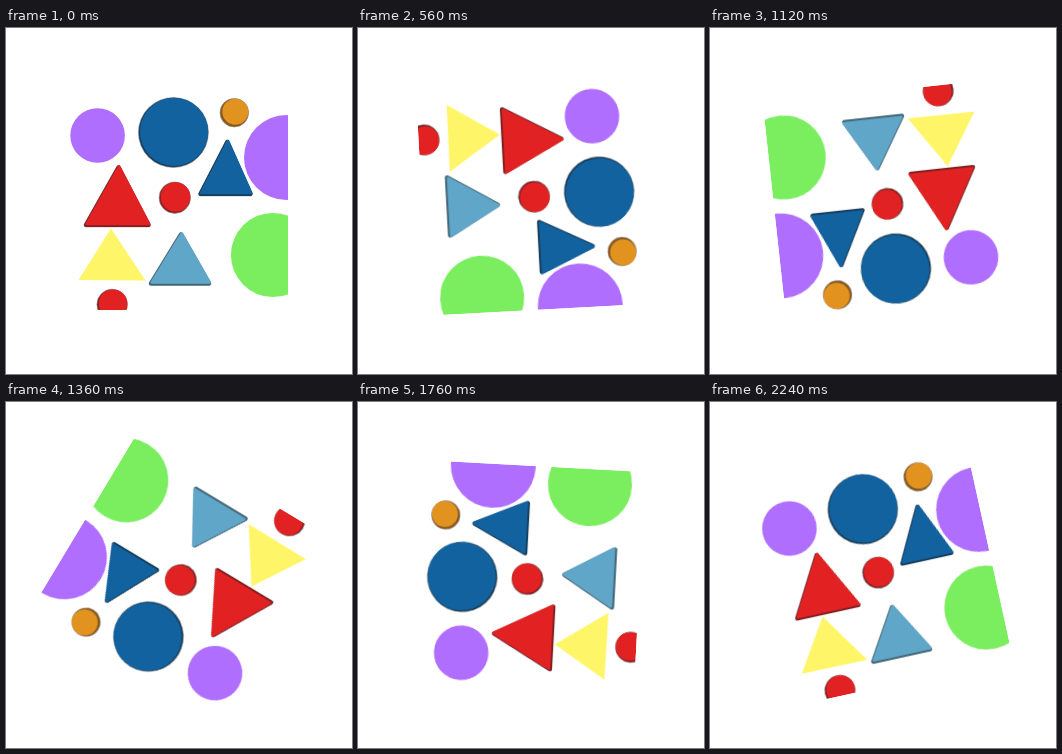
These frames come from a looping animation (346 px wide and 346 px high, 2.32 s). An HTML page:

```html
<!DOCTYPE html>
<html lang="en">
<head>
<meta charset="utf-8">
<title>Rotating shapes</title>
<style>
  html, body { margin: 0; width: 100%; height: 100%; overflow: hidden; background: #fff; }
  svg { display: block; width: 100vw; height: 100vh; }
  #board { transform-origin: 173px 173px; }
</style>
</head>
<body>
<svg viewBox="0 0 346 346">
  <clipPath id="crop"><rect x="64" y="64" width="218" height="218"/></clipPath>
  <g id="board"><g id="shapes" clip-path="url(#crop)"></g></g>
</svg>
<script>
const LOOP = 2320, STEPS = 29;
const shapes = document.getElementById('shapes');

function add(tag, attrs) {
  const el = document.createElementNS('http://www.w3.org/2000/svg', tag);
  for (const key in attrs) el.setAttribute(key, attrs[key]);
  shapes.append(el);
}

const disc = (cx, cy, r, fill) => add('circle', { cx, cy, r, fill });

// Raised disc: pale rim, dark side towards the lower left, then the face
function button(cx, cy, r, face, side, depth) {
  add('circle', { cx, cy, r, fill: side, stroke: '#8d9296', 'stroke-width': 0.6 });
  disc(cx + depth, cy - depth, r - depth * 1.3, face);
}

const triangle = (points, fill, round = 0) => add('polygon', {
  points, fill, stroke: fill, 'stroke-width': round, 'stroke-linejoin': 'round'
});

// Raised triangle given by apex x, top, base y, left and right
function wedge(apex, top, base, left, right, face, side) {
  const at = (dx, dy) =>
    `${apex + dx},${top + 2.5 + dy} ${right - 2.5 + dx},${base - 2 + dy} ${left + 2.5 + dx},${base - 2 + dy}`;
  triangle(at(0, 0), '#8d9296', 4.6);
  triangle(at(0, 0), side, 4);
  triangle(at(0.7, -1), face, 2.6);
}

const purple = '#b06eff', blue = '#12629f', navy = '#153d5c';
const red = '#e22222', maroon = '#821c1e';

disc(91.6, 107.5, 27.3, purple);
disc(280.5, 129.5, 42.5, purple);
disc(267, 227, 42.1, '#7bee60');
button(167.4, 104.5, 35, blue, navy, 0.7);
button(228.3, 84.7, 14.3, '#e2921e', '#87571b', 1);
button(168.8, 169.7, 15.7, red, maroon, 0.7);
button(106.2, 276.5, 15.3, red, maroon, 0.8);
wedge(221.3, 111.5, 168, 192, 247, blue, navy);
wedge(112.5, 137, 199, 77.5, 145, red, maroon);
wedge(175, 204, 257.5, 142.5, 205.5, '#60a6c9', '#3d6577');
triangle('105,200.5 139.5,252.5 72.5,252', '#fff568');

document.getElementById('board').animate(
  [{ transform: 'rotate(0deg)' }, { transform: 'rotate(360deg)' }],
  { duration: LOOP, iterations: Infinity, easing: `steps(${STEPS}, end)` }
);
</script>
</body>
</html>
```
